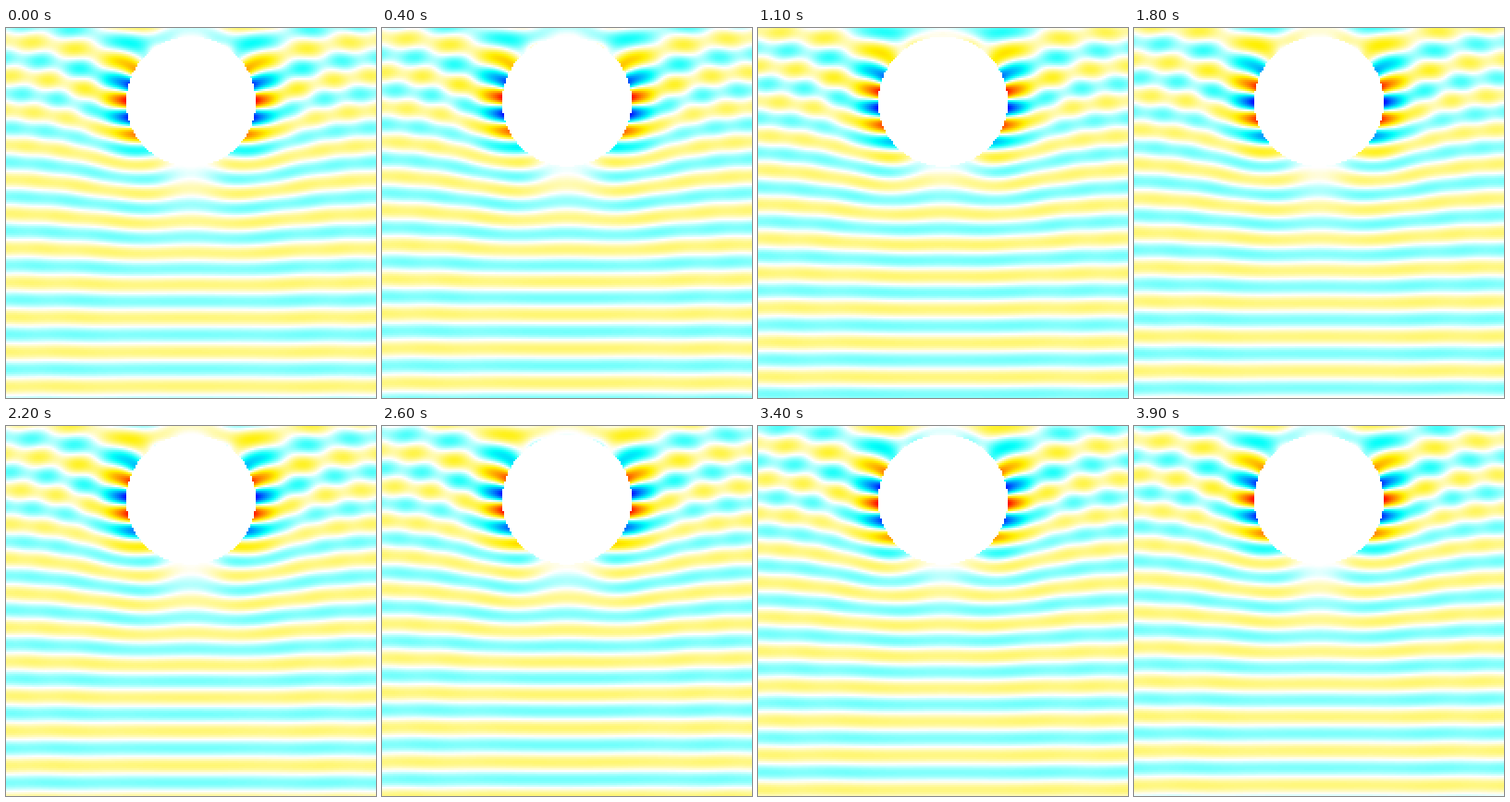
A matplotlib script for the animation above (4 s loop, 400 px wide and 400 px high).

```python
import numpy as np
import matplotlib.pyplot as plt
from matplotlib.animation import FuncAnimation
from matplotlib.colors import LinearSegmentedColormap

SIZE, CELL = 400, 2
FRAMES, INTERVAL = 40, 100
CX, CY, RADIUS = 200, 79.5, 70
K = 2 * np.pi / 37.5
CREST = 275      # height of a crest at the start
ORDER = 10       # angular order of the wave shed by the disc

# Diverging jet with a white centre
stops = [(0, (0, 0, 0.55)), (0.125, (0, 0, 1)), (0.375, (0, 1, 0.98)),
         (0.5, (1, 1, 1)), (0.625, (1, 0.94, 0)), (0.875, (1, 0, 0)),
         (1, (0.5, 0, 0))]
cmap = LinearSegmentedColormap.from_list("wave", stops, N=512)
cmap.set_bad("white")


def step(v):
    return 1 / (1 + np.exp(-v))


def bell(v, width):
    return np.exp(-(v / width) ** 2)


axis = np.arange(SIZE // CELL) * CELL + CELL / 2
x, y = np.meshgrid(axis, axis)
dx, dy = np.abs(x - CX), y - CY
r = np.hypot(dx, dy)
inside = r < RADIUS
r = np.maximum(r, RADIUS)
gap = r - RADIUS
angle = np.arctan2(dy, dx)


def incident():
    """Upward wave, slowed near the disc and weak on its axis."""
    dip = 1.2 * np.exp(-r / 135) * bell(dx, 45)
    delay = 44 * bell(np.hypot(1.15 * dx, dy), 128) * (1 - dip)
    halo = 0.4 * np.exp(-gap / 30)
    fade = 1 - 0.92 * bell(dx, 44) * np.exp(-gap / 30)
    return (1 + halo) * fade * np.exp(1j * K * (y - CREST - delay))


def rim():
    """Strong lobes on the sides: level below, fanning out above."""
    phase = np.where(dy < 0, 12.5 * angle, 0.16 * dy) + 0.23
    amp = 4.6 * np.exp(-gap / 17) * bell(angle - 0.03, 0.68)
    return amp * np.exp(1j * phase)


def shed():
    """Wave leaving the disc tangentially, upwards and outwards."""
    kr = K * r
    radial = np.sqrt(kr ** 2 - ORDER ** 2) - ORDER * np.arccos(ORDER / kr)
    window = step((0.1 - angle) / 0.12) * step((angle + 1.2) / 0.12)
    amp = 0.85 * np.exp(-gap / 130) * window * (1 - np.exp(-gap / 25))
    return amp * np.exp(1j * (ORDER * angle - radial + 1.4))


def echo():
    """Faint reflection back towards the incoming wave."""
    amp = 0.12 * np.sqrt(RADIUS / r) * step((angle - 0.4) / 0.15)
    return amp * np.exp(-1j * K * r)


field = 0.13 * (incident() + rim() + shed() + echo())


def snapshot(i):
    wave = np.real(field * np.exp(2j * np.pi * i / FRAMES))
    return np.ma.array(wave, mask=inside)


fig = plt.figure(figsize=(4, 4), dpi=100)
ax = fig.add_axes([0, 0, 1, 1])
ax.axis("off")
image = ax.imshow(snapshot(0), cmap=cmap, vmin=-1, vmax=1,
                  interpolation="nearest", extent=(0, SIZE, SIZE, 0))


def update(i):
    image.set_data(snapshot(i))
    return [image]


anim = FuncAnimation(fig, update, frames=FRAMES, interval=INTERVAL,
                     repeat=True, repeat_delay=0)
plt.show()
```
